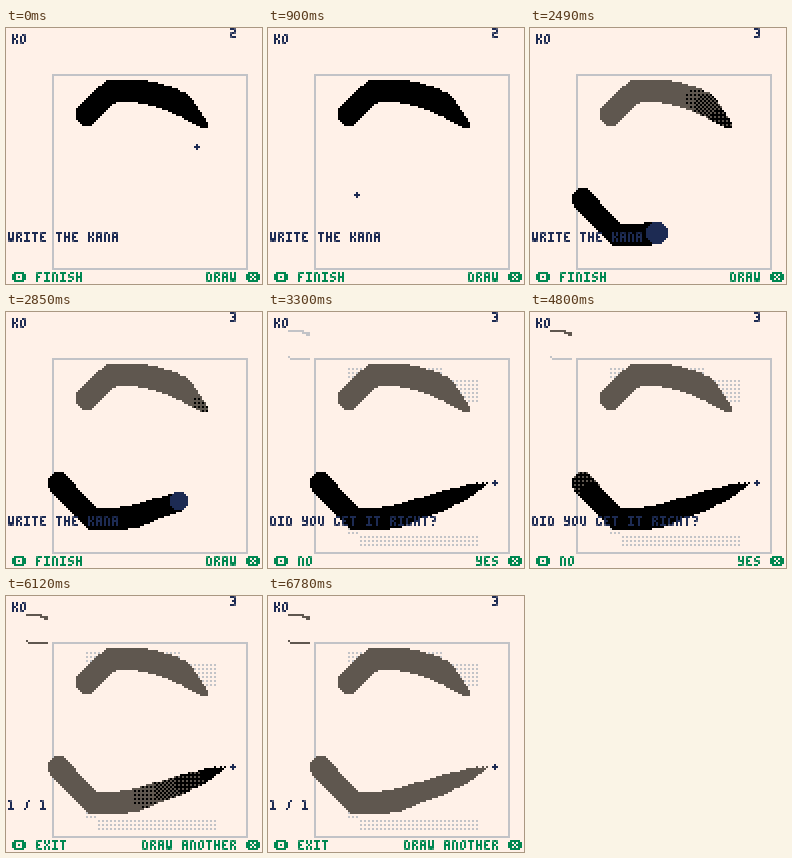
Recreate the animation shown at these times as an HTML page with a canvas. Size 256 by 256 pixels, loop 7170 ms.

```html
<!DOCTYPE html>
<html lang="en">
<head>
<meta charset="utf-8">
<title>Write the kana</title>
<style>
html, body { margin: 0; height: 100%; overflow: hidden; background: #fff1e8; }
canvas { display: block; width: 100vw; height: 100vh; image-rendering: pixelated; }
</style>
</head>
<body>
<canvas id="stage" width="128" height="128"></canvas>
<script>
const LOOP = 7170, STEP = 30;
const PAPER = '#fff1e8', NAVY = '#1d2b53', GREEN = '#008751';
const SILVER = '#c2c3c7', GREY = '#5f574f', BLACK = '#000';
const DRY_START = 3070, DRY_LEVEL = 163;
const ASK = 3300, ANSWER = 5340;
const g = document.getElementById('stage').getContext('2d');

// Pen strokes of a 3x5 pixel font; o and x are the button signs.
const DOT = 'h.001';
const BUTTON = 'M1 0H5M1 4H5M0 1V3M1 1V3M5 1V3M6 1V3';
const FONT = {
  A: 'M0 4V0H2V4M0 2H2', D: 'M1 0H0V4H2V1', E: 'M2 0H0V4H2M0 2H1',
  F: 'M2 0H0V4M0 2H1', G: 'M2 0H1M0 1V4H2V3', H: 'M0 0V4M2 0V4M0 2H2',
  I: 'M0 0H2M0 4H2M1 0V4', K: 'M0 0V4M0 2H1M2 0V1M2 3V4', N: 'M1 0H0V4M2 1V4',
  O: 'M1 0H2V3M0 1V4H1', R: 'M0 4V0H2V1M0 2H1M2 3V4', S: 'M2 0H1M0 1V2H2V3M0 4H1',
  T: 'M0 0H2M1 0V4', U: 'M0 0V3M2 0V4H1', W: 'M0 0V4H2V0M0 3H2',
  Y: 'M0 0V2H2M2 0V4H0', 1: 'M0 0H1V4M0 4H2', 2: 'M0 0H2V2H0V4H2',
  3: 'M0 0H2V4H0M2 2H1', '/': `M2 0${DOT}M1 1V3M0 4${DOT}`,
  '?': `M0 0H2V2H1M1 4${DOT}`, o: `${BUTTON}M3 2${DOT}`,
  x: `${BUTTON}M3 1${DOT}M3 3${DOT}M2 2${DOT}M4 2${DOT}`
};

function print(text, x, y, color) {
  g.strokeStyle = color;
  g.lineCap = 'square';
  for (const ch of text) {
    g.save();
    g.translate(x + .5, y + .5);
    if (FONT[ch]) g.stroke(new Path2D(FONT[ch]));
    g.restore();
    x += ch === 'o' || ch === 'x' ? 8 : 4;
  }
}

// Repeating 2x2 dither with `count` cells in the dot colour.
function dither(base, dot, count) {
  const tile = document.createElement('canvas');
  tile.width = tile.height = 2;
  const c = tile.getContext('2d');
  c.fillStyle = base;
  c.fillRect(0, 0, 2, 2);
  c.fillStyle = dot;
  [[0, 0], [1, 1], [1, 0], [0, 1]].slice(0, count).forEach(([x, y]) => c.fillRect(x, y, 1, 1));
  return g.createPattern(tile, 'repeat');
}
const INK = [0, 1, 2, 3, 4].map(n => dither(BLACK, GREY, n));
const GHOST = dither('transparent', SILVER, 1);

// Keys: time, x, y, brush radius
const STROKES = [
  [[-2150, 40, 43, 5], [-1900, 48, 34.5, 5], [-1800, 52.5, 31, 5], [-1500, 65, 31, 5],
   [-1330, 73, 32.5, 5], [-1070, 82, 35, 5], [-900, 88.5, 38.5, 5], [-740, 94, 43.5, 3],
   [-580, 99.3, 48.5, 1]],
  [[1470, 26, 85, 5], [1560, 26, 85, 5], [1740, 30, 90, 5], [2110, 43, 103, 5],
   [2320, 54, 103, 5], [2490, 63, 102, 5], [2890, 88, 93.5, 4], [3080, 100, 89, 2.5],
   [3220, 110, 85, 0]]
];
const [PRESS, RELEASE] = [STROKES[1][0][0], STROKES[1].at(-1)[0]];
const HOVER = [[0, 95, 59], [380, 75, 79], [600, 63, 84], [720, 56, 84], [900, 44, 83],
  [1200, 30, 85], [1380, 23, 85], [1470, 26, 85], [RELEASE, 110, 85], [3290, 113, 85]];

function at(keys, t) {
  const i = keys.findIndex(k => k[0] >= t);
  if (i < 0) return keys.at(-1).slice(1);
  if (i === 0) return keys[0].slice(1);
  const a = keys[i - 1], b = keys[i], f = (t - a[0]) / (b[0] - a[0]);
  return a.map((v, j) => v + (b[j] - v) * f).slice(1);
}

function disc([x, y, r], fill) {
  x = Math.round(x);
  y = Math.round(y);
  g.fillStyle = fill;
  for (let dy = -Math.round(r); dy <= Math.round(r); dy++) {
    const w = Math.floor(Math.sqrt(Math.max(0, r * r + r - dy * dy)));
    g.fillRect(x - w, y + dy, 2 * w + 1, 1);
  }
}

function ink(keys, t) {
  const end = Math.min(t, keys.at(-1)[0]);
  for (let s = keys[0][0]; s <= end; s += STEP / 2) {
    const level = Math.floor((t - s - DRY_START) / DRY_LEVEL) + 1;
    disc(at(keys, s), INK[Math.max(0, Math.min(4, level))]);
  }
}

// Model kana, as runs of x, y, width for each stroke
const KANA = [[[0, 0, 8], [7, 1, 4], [9, 2, 2]], [[0, 13, 1], [1, 14, 10]]];
function model(stroke, x, y, scale, fill) {
  g.fillStyle = fill;
  for (const [dx, dy, w] of stroke) g.fillRect(x + dx * scale, y + dy * scale, w * scale, scale);
}

function cross([x, y]) {
  x = Math.round(x);
  y = Math.round(y);
  g.fillStyle = NAVY;
  g.fillRect(x - 1, y, 3, 1);
  g.fillRect(x, y - 1, 1, 3);
}

function draw(t) {
  g.fillStyle = PAPER;
  g.fillRect(0, 0, 128, 128);
  g.strokeStyle = SILVER;
  g.strokeRect(23.5, 23.5, 97, 97);
  if (t >= ASK) KANA.forEach((stroke, i) => {
    model(stroke, 40, 28, 6, GHOST);
    model(stroke, 10, 9, 1, t >= ASK + 990 * (i + 1) ? GREY : SILVER);
  });
  STROKES.forEach(keys => ink(keys, t));

  const [message, left, right] =
    t < ASK ? ['WRITE THE KANA', 'FINISH', 'DRAW'] :
    t < ANSWER ? ['DID YOU GET IT RIGHT?', 'NO', 'YES'] :
    ['1 / 1', 'EXIT', 'DRAW ANOTHER'];
  print('KO', 3, 3, NAVY);
  print(t < PRESS - STEP ? '2' : '3', 112, 0, NAVY);
  print(message, 1, 102, NAVY);
  print('o ' + left.replace('X', '\u00d7'), 3, 122, GREEN);
  print(right + ' x', 116 - right.length * 4, 122, GREEN);

  if (t >= PRESS && t <= RELEASE) disc(at(STROKES[1], t), NAVY);
  else cross(at(HOVER, t));
}
FONT['\u00d7'] = `M0 0V1M2 0V1M1 2${DOT}M0 3V4M2 3V4`;

const start = performance.now();
function tick() {
  const t = (performance.now() - start) % LOOP;
  draw(Math.floor(t / STEP) * STEP);
  requestAnimationFrame(tick);
}
tick();
</script>
</body>
</html>
```
